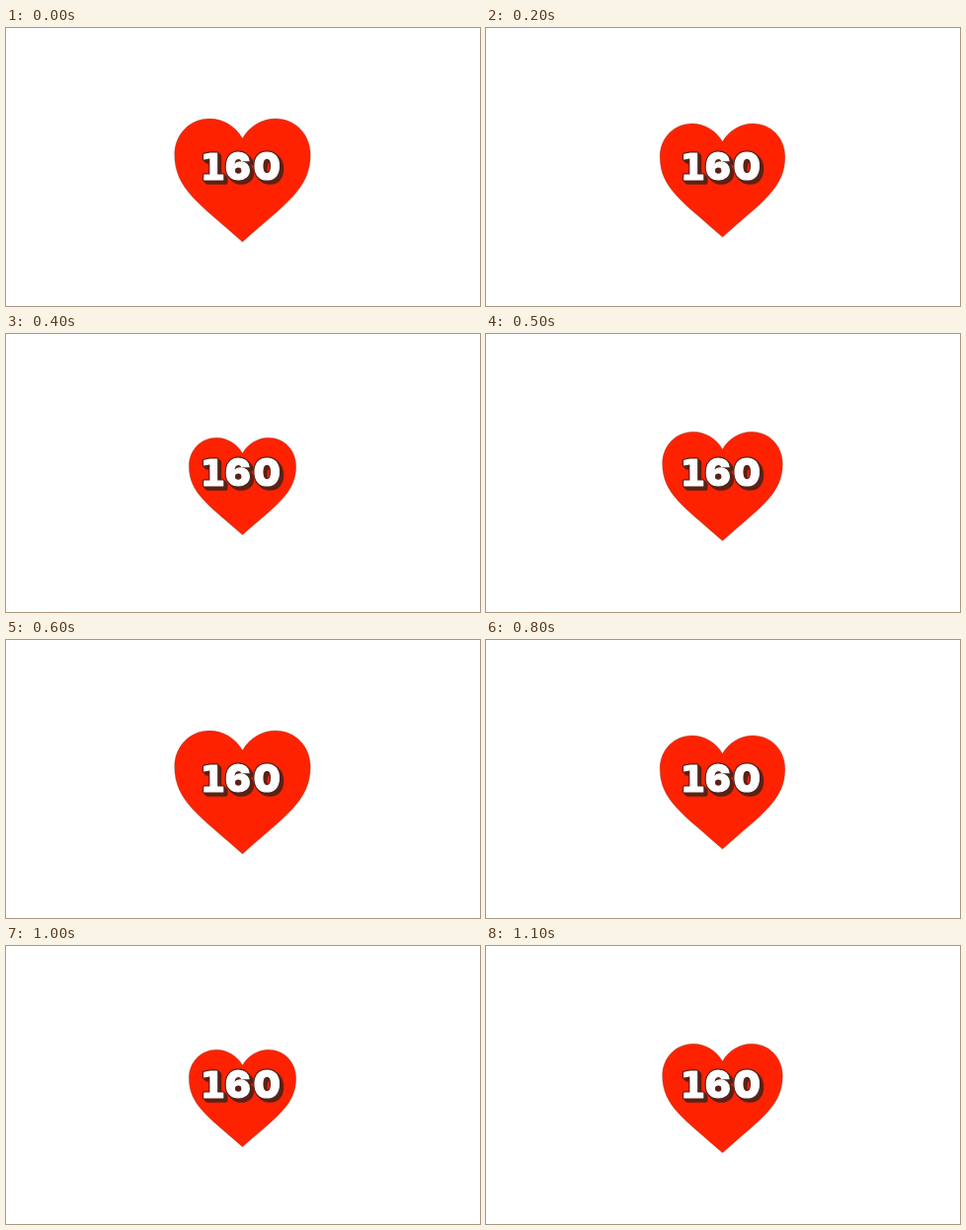
An HTML page for the animation above (1200 ms loop, 480 by 282 pixels).

```html
<!DOCTYPE html>
<html lang="en">
<head>
<meta charset="utf-8">
<title>Heart rate</title>
<style>
  html, body { margin: 0; width: 100%; height: 100%; overflow: hidden; background: #fff; }
  svg { display: block; width: 100vw; height: 100vh; }
  #heart { fill: #ff2200; stroke: #6b3a30; stroke-opacity: .55; stroke-width: .6; vector-effect: non-scaling-stroke; }
  text { font: 900 38px Inter, sans-serif; text-anchor: middle; stroke-linejoin: round; }
  .slab { font: bold 37px "DejaVu Sans", sans-serif; }
  .dark { fill: #5a2218; stroke: #5a2218; stroke-width: 3.6; }
  .face { fill: #fff; stroke: #fff; stroke-width: 1.2; }
</style>
</head>
<body>
<svg viewBox="0 0 480 282">
  <path id="heart" d="M0-42.5C-7-55-20-62.5-33.5-62.5C-53-62.5-68.75-47-68.75-26C-68.75 9-43 24 0 62.5C43 24 68.75 9 68.75-26C68.75-47 53-62.5 33.5-62.5C20-62.5 7-55 0-42.5Z"/>
  <g id="label"></g>
</svg>
<script>
  const LOOP = 1200, BEAT = 600, STEP = 100, PEAK = 64;
  const BASE_WIDTH = 137.5, MEAN_WIDTH = 124.2, SWING = 17;
  const heart = document.getElementById("heart");

  // Extruded number: dark copies stepping down-right under a white face.
  const digits = (cls, shift) =>
    `<text class="${cls}" x="209.3 234.8 264.3" y="154" transform="translate(${shift} ${shift})"><tspan class="slab">1</tspan>60</text>`;
  document.getElementById("label").innerHTML =
    [3, 2, 1, 0].map(shift => digits("dark", shift)).join("") + digits("face", 0);

  function render(ms) {
    const time = Math.floor((ms % LOOP) / STEP) * STEP;
    const width = MEAN_WIDTH + SWING * Math.cos((time - PEAK) / BEAT * 2 * Math.PI);
    heart.setAttribute("transform", `translate(239.5 154.5) scale(${width / BASE_WIDTH})`);
  }

  const start = performance.now();
  function tick() {
    render(performance.now() - start);
    requestAnimationFrame(tick);
  }
  tick();
</script>
</body>
</html>
```
